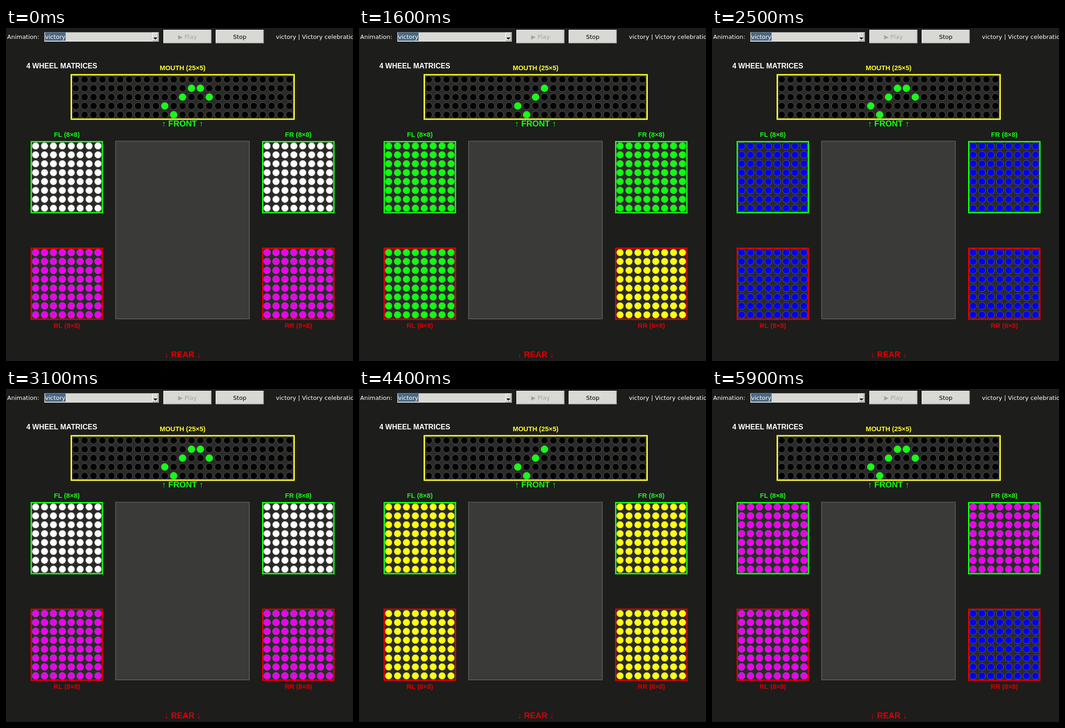
Write an HTML page with a canvas that moves like this. It is 763 by 734 pixels and loops after 6 s.

```html
<!DOCTYPE html>
<html lang="en">
<head>
<meta charset="utf-8">
<title>Matrix animation</title>
<style>
  html, body { margin: 0; width: 100%; height: 100%; overflow: hidden; background: #1d1d1c; }
  canvas { display: block; }
</style>
</head>
<body>
<canvas id="stage" width="763" height="734"></canvas>
<script>
const ctx = document.getElementById('stage').getContext('2d');
const LOOP = 6000, TICK = 100, STEP = 387;
const PITCH = 19.6, RADIUS = 7.8;
const LIME = '#14ff14', YELLOW = '#ffff2e', RED = '#d90000';
const UI = '13px "DejaVu Sans", sans-serif';
const bold = size => `bold ${size}px "Liberation Sans", Arial, sans-serif`;

// red, orange, yellow, green, cyan, blue, magenta, white
const COLORS = ['#e80000', '#f8a508', '#ffff0f', '#0fff0f',
                '#0ff5f5', '#0000f0', '#eb00f0', '#ffffff'];
const START = 7.46;

const WHEELS = [
  { name: 'FL', x: 54, y: 249, edge: LIME, labelY: 240 },
  { name: 'FR', x: 563, y: 249, edge: LIME, labelY: 240 },
  { name: 'RL', x: 54, y: 484, edge: RED, labelY: 661 },
  { name: 'RR', x: 563, y: 484, edge: RED, labelY: 661 },
];

// Mouth cells as [column, row], in drawing order.
const SMILE = [[10, 3], [11, 4], [12, 2], [13, 1], [14, 1], [15, 2]];

function fill(x, y, w, h, color) {
  ctx.fillStyle = color;
  ctx.fillRect(x, y, w, h);
}

function panel(x, y, w, h, color, edge, line) {
  fill(x, y, w, h, edge);
  fill(x + line, y + line, w - 2 * line, h - 2 * line, color);
}

function text(str, x, y, color, font, align = 'left') {
  ctx.font = font;
  ctx.fillStyle = color;
  ctx.textAlign = align;
  ctx.fillText(str, x, y);
}

function dot(x, y, color, edge = '#666666') {
  ctx.beginPath();
  ctx.arc(x, y, RADIUS, 0, 2 * Math.PI);
  ctx.fillStyle = color;
  ctx.fill();
  ctx.strokeStyle = edge;
  ctx.lineWidth = 0.9;
  ctx.stroke();
}

function button(label, x, color) {
  fill(x, 4, 106, 30, '#8a8a88');
  fill(x, 4, 105, 29, '#ffffff');
  fill(x + 1, 5, 104, 28, '#b8b8b6');
  fill(x + 1, 5, 103, 27, '#d8d8d5');
  text(label, x + 53, 23.5, color, UI, 'center');
}

function toolbar() {
  text('Animation:', 2.5, 23.5, '#ffffff', UI);
  fill(84, 9, 252, 21, '#f0f0ee');
  fill(84, 9, 251, 20, '#8a8a88');
  fill(85, 10, 250, 19, '#d8d8d5');
  fill(86, 10, 45, 18, '#4a6984');
  text('victory', 86, 23.5, '#ffffff', UI);

  fill(322, 10, 13, 19, '#777775');
  fill(322, 10, 12, 18, '#ffffff');
  fill(323, 11, 11, 17, '#d8d8d5');
  ctx.beginPath();
  ctx.moveTo(324, 21);
  ctx.lineTo(333, 21);
  ctx.lineTo(328.5, 25.5);
  ctx.fillStyle = '#000000';
  ctx.fill();

  button('▶ Play', 346, '#a3a3a1');
  button('Stop', 461, '#000000');
  text('victory | Victory celebration', 593.5, 23.5, '#ffffff', UI);
}

function mouth(step) {
  const lit = Math.min(SMILE.length, 2 * (Math.floor(step % 8 / 2) + 1));
  panel(142, 101.5, 493, 101, '#2a2a29', YELLOW, 3);
  const place = (col, row, color, edge) =>
    dot(153.3 + col * 19.58, 113.3 + row * 19.5, color, edge);
  for (let row = 0; row < 5; row++)
    for (let col = 0; col < 25; col++) place(col, row, '#000000');
  for (const [col, row] of SMILE.slice(0, lit)) place(col, row, '#14ff14', '#4fae4f');
  text('MOUTH (25×5)', 388.3, 93, YELLOW, bold(14.7), 'center');
}

function wheel({ name, x, y, edge, labelY }, step) {
  panel(x, y, 159.5, 159.5, '#2a2a29', edge, 3);
  for (let row = 0; row < 8; row++)
    for (let col = 0; col < 8; col++)
      dot(x + 11.1 + col * PITCH, y + 11 + row * PITCH, COLORS[step % 8]);
  text(`${name} (8×8)`, x + 79.8, labelY, edge, bold(14.7), 'center');
}

function draw(time) {
  const tick = Math.floor(time % LOOP / TICK) * TICK;
  const progress = START + tick / STEP;

  fill(0, 0, 763, 734, '#1d1d1c');
  toolbar();
  text('4 WHEEL MATRICES', 44.7, 89, '#ffffff', bold(15.8));
  mouth(Math.floor(progress));
  text('↑ FRONT ↑', 388.3, 217.3, LIME, bold(18.3), 'center');
  panel(240, 248.5, 296, 393.5, '#3a3a39', '#555554', 2);
  // The wheels refresh one after another, a quarter step apart.
  WHEELS.forEach((w, i) => wheel(w, Math.floor(progress - i / 4)));
  text('↓ REAR ↓', 388.6, 726, RED, bold(18.3), 'center');
}

const start = performance.now();
function frame() {
  draw(performance.now() - start);
  requestAnimationFrame(frame);
}
frame();
</script>
</body>
</html>
```
